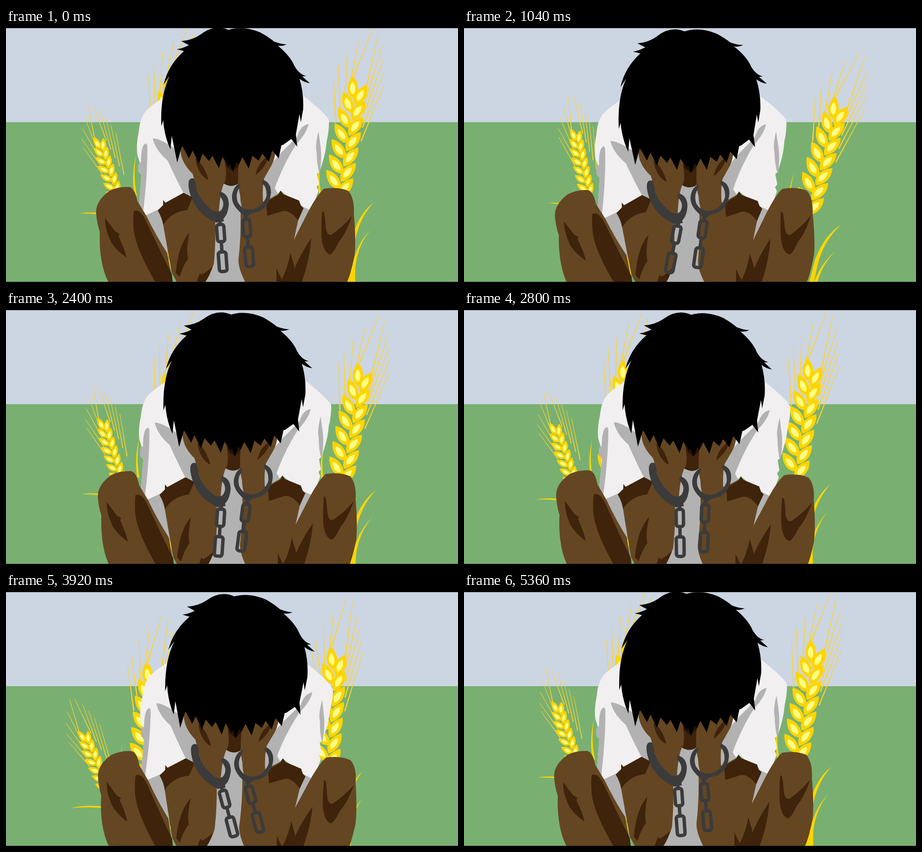
Animation, 998 px wide and 561 px high, one loop 5440 ms. Source, as an HTML page:

```html
<!DOCTYPE html>
<html lang="en">
<head>
<meta charset="utf-8">
<title>Wheat field</title>
<style>
html, body { margin: 0; height: 100%; overflow: hidden; }
svg { display: block; width: 100vw; height: 100vh; }
.skin { fill: #654622; }
.dark { fill: #3f230b; }
.grey { fill: #b2b2b2; }
.white { fill: #f1eff0; }
.iron { fill: #3b3b3b; }
.link { fill: none; stroke: #3b3b3b; stroke-width: 7.5; }
.gold { fill: #ffd500; }
.core { fill: #ffff85; }
.awn { fill: #ffd42a; stroke: #ffd42a; stroke-width: .8; stroke-linejoin: round; }
</style>
</head>
<body>
<svg viewBox="0 0 998 561" preserveAspectRatio="none">
  <defs>
    <g id="grain">
      <path class="gold" d="M0-27C14-13 17 8 4 26C-14 16-16-5 0-27Z"/>
      <path class="core" d="M0-13C8-5 8 8 2 15C-8 9-8-3 0-13Z"/>
    </g>
    <g id="ear"></g>
    <g id="awns" class="awn"></g>
    <g id="stalk">
      <path class="gold" d="M811 386Q777 424 769 480Q765 530 757 570H745Q757 515 762 470Q777 412 811 386ZM805 446Q777 478 771 530L771 570H759Q762 488 805 446ZM695 282Q684 330 692 372H697Q688 330 695 282Z"/>
      <use href="#awns"/><use href="#ear"/>
    </g>
    <g id="chain" class="link">
      <path d="M0-2V10M0 50V70"/>
      <rect x="-8" y="9" width="16" height="38" rx="5"/>
      <rect x="-8.5" y="70" width="17" height="43" rx="5"/>
    </g>
  </defs>

  <path fill="#ccd5e2" d="M0 0H998V208H0Z"/>
  <path fill="#79b071" d="M0 208H998V561H0Z"/>

  <g id="wheat">
    <use href="#stalk" x="-408" y="-2"/>
    <use href="#stalk"/>
    <use href="#awns" transform="translate(193 246) rotate(-33) scale(.7) translate(-764 -104)"/>
    <use href="#ear" transform="translate(193 241) rotate(-28) scale(.57) translate(-764 -104)"/>
    <path class="gold" d="M162 410Q195 403 250 416V419Q195 408 162 410Z"/>
  </g>

  <g id="body">
    <!-- shirt -->
    <path class="white" d="M360 146Q325 167 312 180Q296 195 293 230Q287 258 290 280L296 300L293 318L299 325L294 390L308 415L345 397L392 364L500 440L607 360L645 390L674 404L690 360L686 351L691 345L687 322L692 318Q706 280 708 250Q714 225 713 203Q702 184 645 141Z"/>
    <path class="grey" d="M310 255Q298 255 298 297Q290 295 292 317L299 325L294 392L303 405Q313 320 312 260ZM324 244Q340 242 385 275L420 330L400 368L392 364Q380 343 357 293Q330 270 324 244ZM690 228Q682 260 686 275Q686 300 692 322Q698 295 695 265ZM643 240Q650 215 668 212Q664 232 640 258Q607 310 588 370L560 372V330L605 278Z"/>
    <path class="grey" d="M412 330L392 364L400 440L430 561H550L600 440V365L560 300H440Z"/>
    <path class="grey" d="M306 415L338 400Q355 440 358 500Q328 455 306 415ZM648 391L673 403L636 470Q634 425 648 391Z"/>

    <!-- thighs -->
    <path class="skin" d="M347 434Q365 405 392 374L411 374L440 405L462 430Q463 480 459 520Q452 543 440 561H377L366 540Q355 480 347 434Z"/>
    <path class="skin" d="M518 402L577 380L606 364L650 398L645 425L636 466L660 561H528Q510 525 514 505Q519 460 518 402Z"/>
    <path class="dark" d="M392 364L352 386L347 380V391L335 403Q345 420 347 435Q365 406 400 402L412 374ZM574 385L601 369L606 359L612 367L647 381L651 392L657 398L645 425Q629 403 612 404L577 415Z"/>
    <path class="dark" d="M405 452Q397 490 402 510Q393 520 383 550L375 541Q380 480 405 452ZM421 561L428 541L432 545Q447 537 456 526Q450 547 440 561ZM597 561V531L609 555Q622 530 628 497L642 545V561Z"/>

    <!-- shins -->
    <path class="skin" d="M199 408Q198 382 228 360Q248 350 272 351Q284 353 290 382L310 415Q333 462 356 497L368 561H226Q205 520 207 450Q200 428 199 408Z"/>
    <path class="dark" d="M219 420L241 449L251 455L248 459Q262 488 266 507Q243 491 232 473Q217 440 219 420ZM282 404Q297 398 311 430Q344 500 366 543L368 561H330Q288 490 282 447Q280 420 282 404Z"/>
    <path class="skin" d="M636 467L666 408Q687 368 702 355Q735 350 756 360Q770 376 768 410Q773 465 770 500Q761 545 753 561H637Z"/>
    <path class="dark" d="M698 407Q703 396 706 440Q708 458 718 457Q744 439 764 415Q752 452 735 472Q722 500 715 500Q701 496 697 465Q696 430 698 407ZM674 464Q671 510 653 561H636V533Q650 500 674 464Z"/>

    <!-- face and hands -->
    <path class="dark" d="M470 285H525L515 342Q499 355 480 343Z"/>
    <path fill="#241405" d="M484 280H518L514 303L501 317L486 305Z"/>
    <path class="skin" d="M386 258L480 282Q489 320 484 338Q473 355 470 408Q440 405 424 375Q419 345 412 322Q387 298 385 270Z"/>
    <path class="skin" d="M515 288L594 260Q597 282 587 302L570 332Q565 355 568 390Q550 406 525 402Q518 395 517 370Q509 340 515 288Z"/>
    <path class="dark" d="M418 288Q438 302 447 336Q424 325 418 288ZM551 325Q556 297 579 283Q576 305 551 325Z"/>

    <!-- hair -->
    <path d="M491 4Q525-6 562 10Q580 20 592 30Q608 36 620 36Q610 41 600 39Q628 62 637 84Q648 103 663 106L654 107L671 122Q658 120 648 112Q658 145 656 180L651 208L648 190L640 235L643 262L630 245L612 258L500 290L388 262L378 297L366 238L363 268Q350 240 347 204L343 217Q340 150 361 106L348 125Q358 82 393 51L377 47Q390 45 404 38L387 29Q412 27 430 14Q460-9 491 4Z"/>
    <path id="fringe"/>

    <!-- shackles -->
    <g id="chainL"><use href="#chain"/></g>
    <g id="chainR"><use href="#chain"/></g>
    <path class="iron" d="M403 341Q405 329 416 333Q420 345 421 358Q430 383 457 404Q470 409 476 401Q486 385 470 369L472 361Q492 366 492 390Q490 412 480 421L481 427L464 430Q420 410 407 368Q402 352 403 341Z"/>
    <path class="iron" d="M518 342L516 352Q506 365 511 383Q520 402 542 401Q566 397 575 372Q577 352 565 342L567 335Q585 341 585 363Q583 391 560 405L541 410L533 417L523 412Q497 392 499 370Q502 348 518 342Z"/>
  </g>
  <path fill="#000" fill-opacity=".4" d="M0 0H998V1H0ZM0 560H998V561H0Z"/>
</svg>
<script>
const el = id => document.getElementById(id);
const repeat = (n, make) => Array.from({ length: n }, (_, i) => make(i)).join('');

// Two rows of grains along a leaning spine
const spine = y => 767 - .165 * (y - 150);
const grain = (x, y, tilt) =>
  `<use href="#grain" transform="translate(${x} ${y}) rotate(${tilt})"/>`;
el('ear').innerHTML = repeat(7, i => {
  const open = 1 - .4 ** i, left = 132 + 34 * i, right = 148 + 34 * i;
  return grain(spine(left) - 5 - 9 * open, left, -34 * open)
    + grain(spine(right) + 15, right, 32 + 10 * open);
});

// Tapered awns climb on the left of the ear and fall on its right
const awn = (x, y, baseX, baseY) => `<path d="M${x} ${y}L${baseX - 1} ${baseY}h2Z"/>`;
el('awns').innerHTML = repeat(5, i =>
  awn(723 + 86 * (i / 4) ** 1.5, 107 - 26 * i, 728 + 10 * i, 210 - 26 * i)
  + awn(835 - 13 * .3 ** i, 13 + 28 * i, 796 - 3 * i, 130 + 30 * i));

// Pointed strands hang from an arc, longest in the middle
const hem = x => 286 - 24 * ((x - 500) / 110) ** 2;
el('fringe').setAttribute('d', 'M390 240' + repeat(10, i => {
  const x = 390 + 22 * i, tip = x + 14;
  return `L${x} ${hem(x)}L${tip} ${hem(tip) + 20 + 7 * Math.sin(2.4 * i)}`;
}) + 'L612 240ZM484 270L501 317L518 270Z');

const LOOP = 5440, STEP = 80, END = LOOP - STEP;

// Straight tweens between [time, ...values], resting at zero on both ends
function tween(t, keys) {
  const zero = keys[0].slice(1).map(() => 0);
  const all = [[0, ...zero], ...keys, [END, ...zero]];
  const i = all.findIndex((k, n) => n && t <= k[0]);
  const [a, b] = [all[i - 1], all[i]];
  const p = (t - a[0]) / (b[0] - a[0]);
  return zero.map((_, n) => a[n + 1] + (b[n + 1] - a[n + 1]) * p);
}

// Keys: time, turn in radians, shift x, shift y
const wheatKeys = [[1280, .137, 0, 13.5], [2720, -.008, 0, 2], [4080, -.1, -4, 43]];
const bodyKeys = [[1400, -.02, 5.4, 4.7], [3440, .031, .6, 7.2]];
const leftKeys = [[1360, .365], [4240, -.282]];
const rightKeys = [[1712, .4], [4160, -.26]];

const deg = r => r * 180 / Math.PI;
function sway(id, t, keys, px, py) {
  const [a, x, y] = tween(t, keys);
  el(id).setAttribute('transform', `translate(${x} ${y}) rotate(${deg(a)} ${px} ${py})`);
}
function swing(id, t, keys, px, py, rest) {
  el(id).setAttribute('transform', `translate(${px} ${py}) rotate(${deg(tween(t, keys)[0] - rest)})`);
}

function draw() {
  const t = Math.floor(performance.now() % LOOP / STEP) * STEP;
  sway('wheat', t, wheatKeys, 486, 600);
  sway('body', t, bodyKeys, 486, 561);
  swing('chainL', t, leftKeys, 472, 425, .07);
  swing('chainR', t, rightKeys, 529, 414, .087);
  requestAnimationFrame(draw);
}
draw();
</script>
</body>
</html>
```
